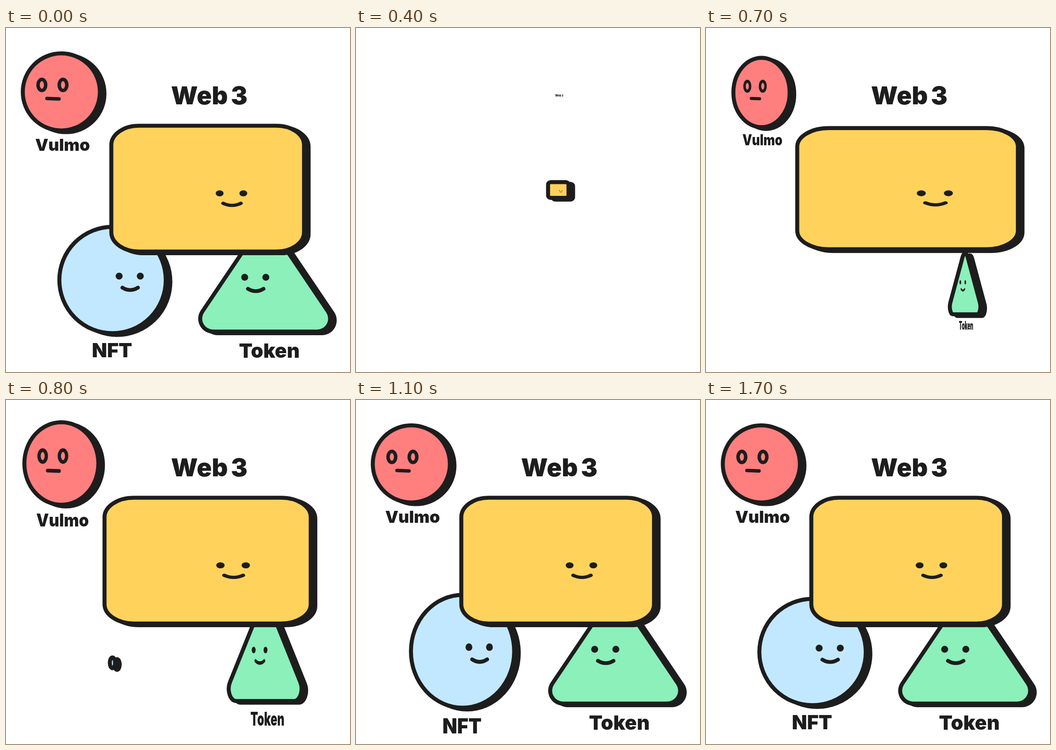
Write an HTML page with a canvas that moves like this. It is 748 by 748 pixels and loops after 2 s.

```html
<!DOCTYPE html>
<html lang="en">
<head>
<meta charset="utf-8">
<title>Web 3 shapes</title>
<style>
  html, body { margin: 0; width: 100%; height: 100%; overflow: hidden; background: #fff; }
  canvas { display: block; }
</style>
</head>
<body>
<canvas id="stage" width="748" height="748"></canvas>
<script>
const ctx = document.getElementById('stage').getContext('2d');
const INK = '#1d1d1d';
const OUTLINE = 8.7;
const SHADOW = { x: 10, y: 3.7 };
const STEP_MS = 100, STEPS = 20;

// Each figure grows around its pivot; sx and sy list the scale per step from `start`.
const figures = [
  {
    pivot: [121.8, 151.8], color: '#ff7f7f', label: ['Vulmo', 123, 267, 36],
    start: 5, sx: [.05, .337, .73, .96], sy: [.11, .47, .9, 1.07],
    path: () => ctx.arc(120.3, 139, 83.8, 0, 7),
    face: calmFace, blinkStart: 12, blink: [.7, .27, .08, .35, .75]
  },
  {
    pivot: [231.5, 574], color: '#c2e8ff', label: ['NFT', 230.5, 716, 43],
    start: 8, sx: [.05, .385, .76, .97], sy: [.1, .44, .88, 1.06],
    path: () => ctx.arc(231.7, 548, 115.7, 0, 7),
    face: open => smile(269, 539.5, 1, 1, open), blinkStart: 15, blink: [.5, .5]
  },
  {
    pivot: [563.4, 568.7], color: '#8bf0ba', label: ['Token', 572.5, 717, 43],
    start: 6, sx: [.04, .235, .56, .845, .97], sy: [.19, .589, .94, 1.152, 1.06],
    path: triangle,
    face: open => smile(542, 542, 1, 1, open), blinkStart: 15, blink: [.5, .5]
  },
  {
    pivot: [440, 352.7], color: '#ffd25c',
    start: 4, sx: [.106, .57, .978, 1.145, 1.07], sy: [.125, .47, .81, .964, 1],
    path: () => ctx.roundRect(229, 212.5, 419, 273.5, { x: 60, y: 42 }),
    face: open => smile(490.3, 359.5, 1.12, .87, open), blinkStart: 15, blink: [.5, .5]
  }
];

function triangle() {
  const top = [563.5, 414], right = [729.4, 660], left = [397.6, 660], radius = 28;
  ctx.moveTo(563.5, 660);
  ctx.arcTo(...left, ...top, radius);
  ctx.arcTo(...top, ...right, radius);
  ctx.arcTo(...right, ...left, radius);
  ctx.closePath();
}

// Runs `draw` with the drawing scaled around (x, y).
function scaled(x, y, sx, sy, draw) {
  ctx.save();
  ctx.translate(x, y);
  ctx.scale(sx, sy);
  ctx.translate(-x, -y);
  draw();
  ctx.restore();
}

function smile(x, y, kx, ky, open) {
  scaled(x, y, kx, ky, () => {
    for (const side of [-23, 23]) {
      ctx.beginPath();
      ctx.ellipse(x + side, y, 7.6, 7.6 * open, 0, 0, 7);
      ctx.fill();
    }
    ctx.lineWidth = 8;
    ctx.beginPath();
    ctx.moveTo(x - 16, y + 25);
    ctx.quadraticCurveTo(x + 1, y + 35.5, x + 18, y + 25);
    ctx.stroke();
  });
}

function calmFace(open) {
  ctx.lineWidth = 7.5;
  for (const x of [78, 124]) {
    scaled(x, 136.3, 1, open, () => {
      ctx.beginPath();
      ctx.ellipse(x, 123.8, 8.3, 12, 0, 0, 7);
      ctx.stroke();
    });
  }
  ctx.beginPath();
  ctx.moveTo(89, 153.3);
  ctx.lineTo(115.3, 154.2);
  ctx.stroke();
}

function label(text, x, baseline, size) {
  ctx.font = `900 ${size}px Inter, sans-serif`;
  ctx.fillText(text, x, baseline);
}

// The path is scaled, but the outline and the shadow offset are not.
function body(figure, sx, sy, dx, dy, fill) {
  ctx.save();
  ctx.translate(dx, dy);
  ctx.beginPath();
  scaled(...figure.pivot, sx, sy, figure.path);
  ctx.fillStyle = fill;
  ctx.fill();
  if (sx >= .05) {
    ctx.lineWidth = OUTLINE;
    ctx.stroke();
  }
  ctx.restore();
}

function drawFigure(figure, step) {
  const i = step - figure.start;
  if (step > 0 && i < 0) return;
  const sx = figure.sx[i] ?? 1, sy = figure.sy[i] ?? 1;
  const open = figure.blink[step - figure.blinkStart] ?? 1;
  const sliver = sx < .05;
  body(figure, sx, sy, SHADOW.x, SHADOW.y, INK);
  body(figure, sx, sy, 0, 0, sliver ? INK : figure.color);
  scaled(...figure.pivot, sx, sy, () => {
    if (!sliver) figure.face(open);
    if (figure.label) label(...figure.label);
  });
}

function drawTitle(step) {
  if (step > 0 && step < 4) return;
  const progress = step === 0 ? 1 : Math.min(1, .054 + (step - 4) * .323);
  const size = 1 - (1 - progress) ** 2;
  scaled(442, 146.5, size, size, () => label('Web 3', 442, 166, 54));
}

function render(now) {
  const step = Math.floor(now / STEP_MS) % STEPS;
  ctx.fillStyle = '#fff';
  ctx.fillRect(0, 0, 748, 748);
  ctx.fillStyle = ctx.strokeStyle = INK;
  ctx.lineCap = ctx.lineJoin = 'round';
  ctx.textAlign = 'center';
  ctx.wordSpacing = '-4px';
  for (const figure of figures) drawFigure(figure, step);
  drawTitle(step);
}

const begin = performance.now();
function tick() {
  render(performance.now() - begin);
  requestAnimationFrame(tick);
}
tick();
</script>
</body>
</html>
```
